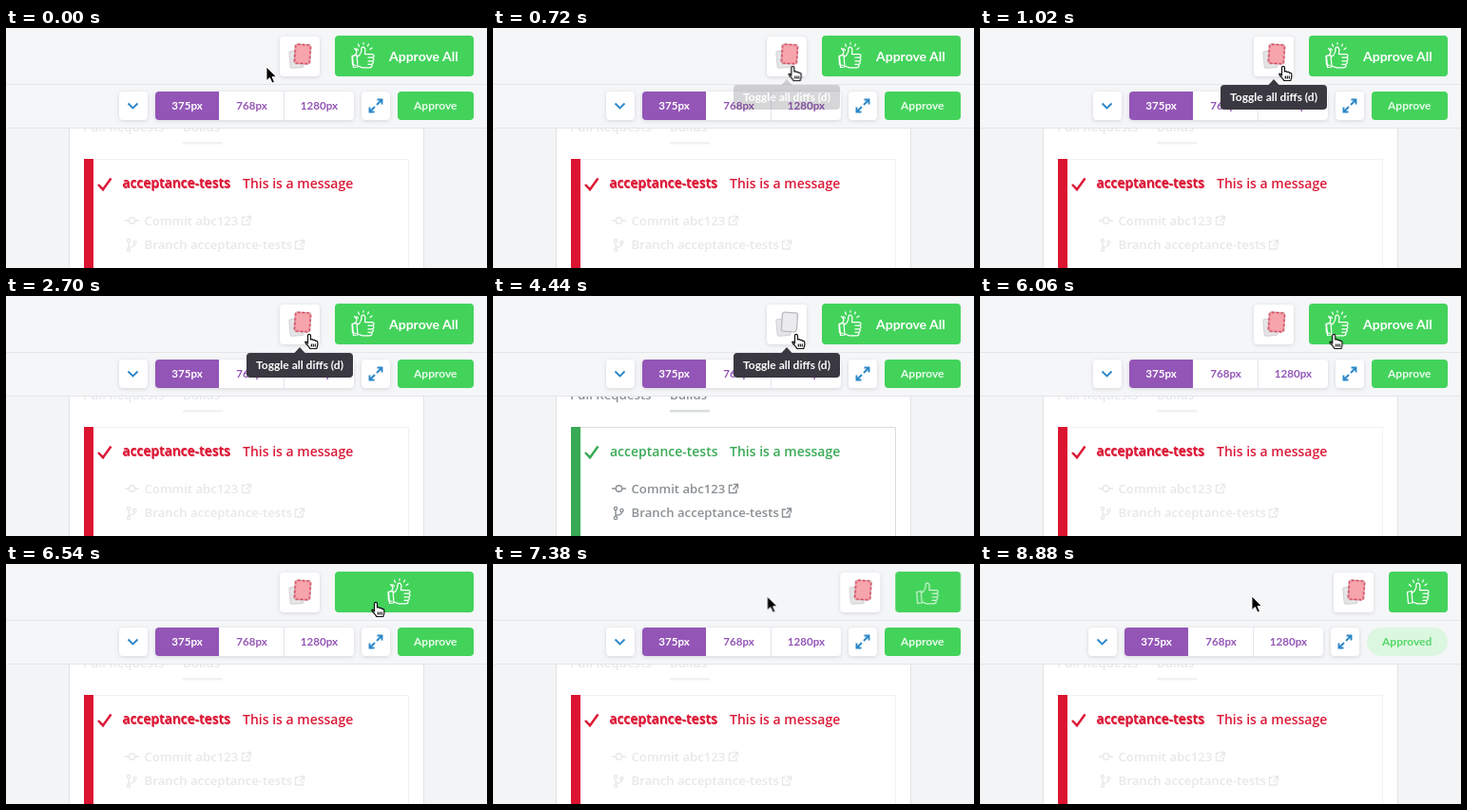
Recreate the animation shown at these times as an HTML page. Size 506 by 253 pixels, loop 9360 ms.

```html
<!DOCTYPE html>
<html lang="en">
<head>
<meta charset="utf-8">
<title>Visual review</title>
<style>
  html, body { margin: 0; width: 100%; height: 100%; overflow: hidden; background: #f5f6f8; }
  svg { display: block; }
  text { font: 700 11.6px Lato, sans-serif; }
  .doc text { font: 600 13.2px "Open Sans", sans-serif; }
  .doc .title { font-size: 14px; fill: var(--main); }
  .doc .faint { fill: var(--faint); }
  .doc .icon { stroke: var(--faint); fill: none; stroke-width: 1.4; }
  .live { --main: #39aa56; --faint: #8a9094; --bar: #39aa56; --line: #d8dddd; }
  .diff { --main: #dc1a38; --faint: #e7e8e9; --bar: #dc1432; --line: #f1f1f2; }
  .raised { fill: #fff; filter: drop-shadow(0 1px 2px rgba(60, 70, 90, .18)); }
  .green { fill: #43d35b; }
  .blue { fill: none; stroke: #2a87c9; stroke-width: 1.9; }
  .purple { fill: #9355b6; }
  .white { fill: #fff; }
  .hand { fill: none; stroke: #fff; stroke-width: 1.25; stroke-linejoin: round; stroke-linecap: round; }
</style>
</head>
<body>
<svg width="506" height="253" viewBox="0 0 506 253">
  <defs>
    <g id="doc" class="doc">
      <path fill="#fff" stroke="#e1e3e5" d="M66.5 100.5H439.5V260H66.5Z"/>
      <text class="faint" x="81" y="109">Pull Requests</text>
      <text class="faint" x="186" y="109">Builds</text>
      <path stroke="var(--line)" stroke-width="2.5" d="M186 121.3H228"/>
      <path fill="#fff" stroke="var(--line)" d="M82.5 138.5H423.5V260H82.5Z"/>
      <path fill="var(--bar)" d="M82 138h10v115H82Z"/>
      <path fill="none" stroke="var(--main)" stroke-width="2.5" d="M97 165l5 5.2L110.5 158.5"/>
      <text class="title" x="123" y="169">acceptance-tests</text>
      <text class="title" x="249" y="169">This is a message</text>
      <g class="icon">
        <circle cx="132.500" cy="203" r="3.200"/>
        <path d="M125 203h4M136 203h4"/>
        <circle cx="129" cy="224" r="1.600"/>
        <circle cx="129" cy="234" r="1.600"/>
        <circle cx="135.500" cy="226" r="1.600"/>
        <path d="M129 226v6M135.500 228q0 3-6.500 3"/>
      </g>
      <text class="faint" x="145.500" y="207.500">Commit abc123</text>
      <text class="faint" x="145.500" y="232.500">Branch acceptance-tests</text>
      <path id="link" class="icon" d="M252 199.500h-3.500v8h7.500v-4M253 198.500h4.500v4.500M257 199l-4.500 5"/>
      <use href="#link" x="56" y="25.500"/>
    </g>
  </defs>

  <rect width="506" height="253" fill="#f3f4f6"/>
  <use href="#doc" class="live"/>
  <g id="diff" class="diff doc">
    <use href="#doc"/>
    <text class="title" x="122.300" y="168">acceptance-tests</text>
  </g>

  <rect width="506" height="106" fill="#f5f6f8"/>
  <path stroke="#e3e5e8" d="M0 59.500H506M0 105.500H506"/>

  <g id="tools">
    <rect class="raised" x="119" y="67" width="30" height="30" rx="4"/>
    <path class="blue" d="M128.500 79.500l5 5 5-5"/>
    <rect class="raised" x="157" y="67" width="209" height="30" rx="4"/>
    <path class="purple" d="M224 67H161a4 4 0 0 0-4 4V93a4 4 0 0 0 4 4H224Z"/>
    <path stroke="#e6e3ea" d="M292.500 67v30"/>
    <g text-anchor="middle">
      <text class="white" x="190.500" y="86">375px</text>
      <text class="purple" x="258.500" y="86">768px</text>
      <text class="purple" x="329.500" y="86">1280px</text>
    </g>
    <rect class="raised" x="374" y="67" width="30" height="30" rx="4"/>
    <path class="blue" stroke-width="1.700" d="M390 81l5-5M390.500 75.500h5v5M388 83l-5 5M382.500 83.500v5h5"/>
  </g>

  <rect id="approve" class="green" x="412" y="67" width="80" height="30" rx="4"/>
  <text id="todo" x="429" y="86" fill="#e9fbec" style="font-size:12px">Approve</text>
  <text id="done" x="423" y="86" fill="#55d769" style="font-size:12px">Approved</text>

  <g id="toggle">
    <rect class="raised" x="288" y="9" width="42" height="42" rx="4"/>
    <rect x="298.500" y="24" width="14" height="18" rx="2" fill="#e5e5e7" stroke="#d2d2d6" transform="rotate(-5 305 33)"/>
    <g transform="rotate(4 312 27)">
      <rect x="304" y="17.500" width="16" height="20" rx="2" fill="#ececef" stroke="#b9b9c0" stroke-width="1.300"/>
      <rect id="mark" x="304" y="17.500" width="16" height="20" rx="2" fill="#f6a5ad" stroke="#d83a50" stroke-width="1.500" stroke-dasharray="3 1.800"/>
    </g>
  </g>

  <rect id="all" class="green" y="8" width="146" height="43" rx="4"/>
  <text id="allText" class="white" x="403" y="34.500" style="font-size:14px">Approve All</text>
  <g id="thumb" class="hand">
    <path id="second" d="M5 23.500L1.500 22.500 1 13.500 4.500 12.500 6 9.500 5 6.500q1.500-1.500 2.500 1"/>
    <path d="M1.500 13.500L6 12.500 7 25 2.500 25.500ZM6.500 14.500L9 12.500Q11.500 9 11 5q2.500-2.500 4 1.500L14.500 11.500H22.500q3 1.700.3 3.700 2.500 1.800-.3 3.700 2 1.800-.7 3.500 1 2.800-2 3.400H12L7 24M18 15.200h4.500M18 18.900h4M18 22.400h3.500"/>
    <path id="spark" d="M3.500 5.500l2 2M7.500 1l1 2.500M13-.500v1.500M18.500 1l-1 2M22 5l-2 1.500"/>
  </g>

  <g id="tip">
    <path fill="#3a3840" d="M303 60.500L309 54l6 6.500Z"/>
    <rect x="253" y="60" width="112" height="26" rx="4" fill="#3a3840"/>
    <text class="white" x="309" y="77" text-anchor="middle" style="font-size:12px">Toggle all diffs (d)</text>
  </g>

  <g id="cursor">
    <path id="arrow" stroke="#fff" stroke-width=".9" d="M0 0V14.500L3.400 11.400 6 17 8.400 16 6 10.400H10.400Z"/>
    <path id="pointer" fill="#fff" stroke="#111" stroke-width="1.200" stroke-linejoin="round" transform="translate(-5 0)"
      d="M3.500 10V1.800a1.500 1.500 0 0 1 3 0V6c1-.8 2.200-.5 2.600.6 1-.6 2.100-.3 2.400.8 1.300-.4 2.300.3 2.300 1.700V11.500c0 1.500-.8 2.300-1 4H5.800C5 13.500 2.500 11.500 1 9.300 .3 8 1.800 7.200 3.500 10ZM7.300 10.500v3M9.300 10.500v3M11.300 10.500v3"/>
  </g>
</svg>
<script>
  const LOOP = 9360;

  // steps: [time, value, easing towards the next step]
  function track(id, prop, steps, easing = 'linear') {
    const full = [[0, steps[0][1]], ...steps, [LOOP, steps[steps.length - 1][1]]];
    const frames = full.map(([t, value, ease]) =>
      ({ offset: t / LOOP, [prop]: value, easing: ease || easing }));
    document.getElementById(id).animate(frames, { duration: LOOP, iterations: Infinity });
  }

  const at = (x, y = 0) => `translate(${x}px, ${y}px)`;

  const visible = [
    [1500, 1], [1740, 0], [2220, 0], [2460, 1],
    [3480, 1], [3780, 0], [4740, 0], [4960, 1]
  ];
  track('diff', 'opacity', visible);
  track('mark', 'opacity', visible);

  track('cursor', 'transform', [
    [380, at(274, 41), 'ease'], [900, at(319, 40)],
    [5700, at(319, 40)], [5760, at(323.5, 40), 'ease-out'], [6300, at(389, 40)],
    [6900, at(389, 40), 'ease'], [7500, at(286, 34)]
  ]);
  const hover = [[540, 0], [541, 1], [7020, 1], [7021, 0]];
  track('pointer', 'opacity', hover, 'step-end');
  track('arrow', 'opacity', hover.map(([t, v]) => [t, 1 - v]), 'step-end');
  track('tip', 'opacity', [[660, 0], [960, 1], [5820, 1], [6000, 0]]);

  track('allText', 'opacity', [[6300, 1], [6480, 0]]);
  track('thumb', 'transform', [
    [6300, at(363, 16), 'ease-out'], [6520, at(401, 16)],
    [6900, at(401, 16), 'ease-in-out'], [7500, at(448, 16)]
  ]);
  track('thumb', 'opacity', [[6540, 1], [7200, .75], [7920, .75], [7980, 1]]);
  track('second', 'opacity', [[6900, 1], [7080, 0]]);
  track('spark', 'opacity', [[6900, 1], [7080, 0], [7920, 0], [7980, 1]]);
  track('all', 'transform', [[6900, at(346), 'ease-in-out'], [7500, at(430)]]);
  track('all', 'width', [[6900, '146px', 'ease-in-out'], [7500, '62px']]);
  track('toggle', 'transform', [[6900, at(0), 'ease-in-out'], [7500, at(84)]]);

  const approved = (id, prop, from, to) => track(id, prop, [[8220, from], [8400, to]]);
  approved('tools', 'transform', at(0), at(-5));
  approved('approve', 'x', '412px', '407px');
  approved('approve', 'width', '80px', '85px');
  approved('approve', 'rx', '4px', '15px');
  approved('approve', 'fill', '#43d35b', '#dcf7e0');
  approved('todo', 'opacity', 1, 0);
  approved('done', 'opacity', 0, 1);
</script>
</body>
</html>
```
